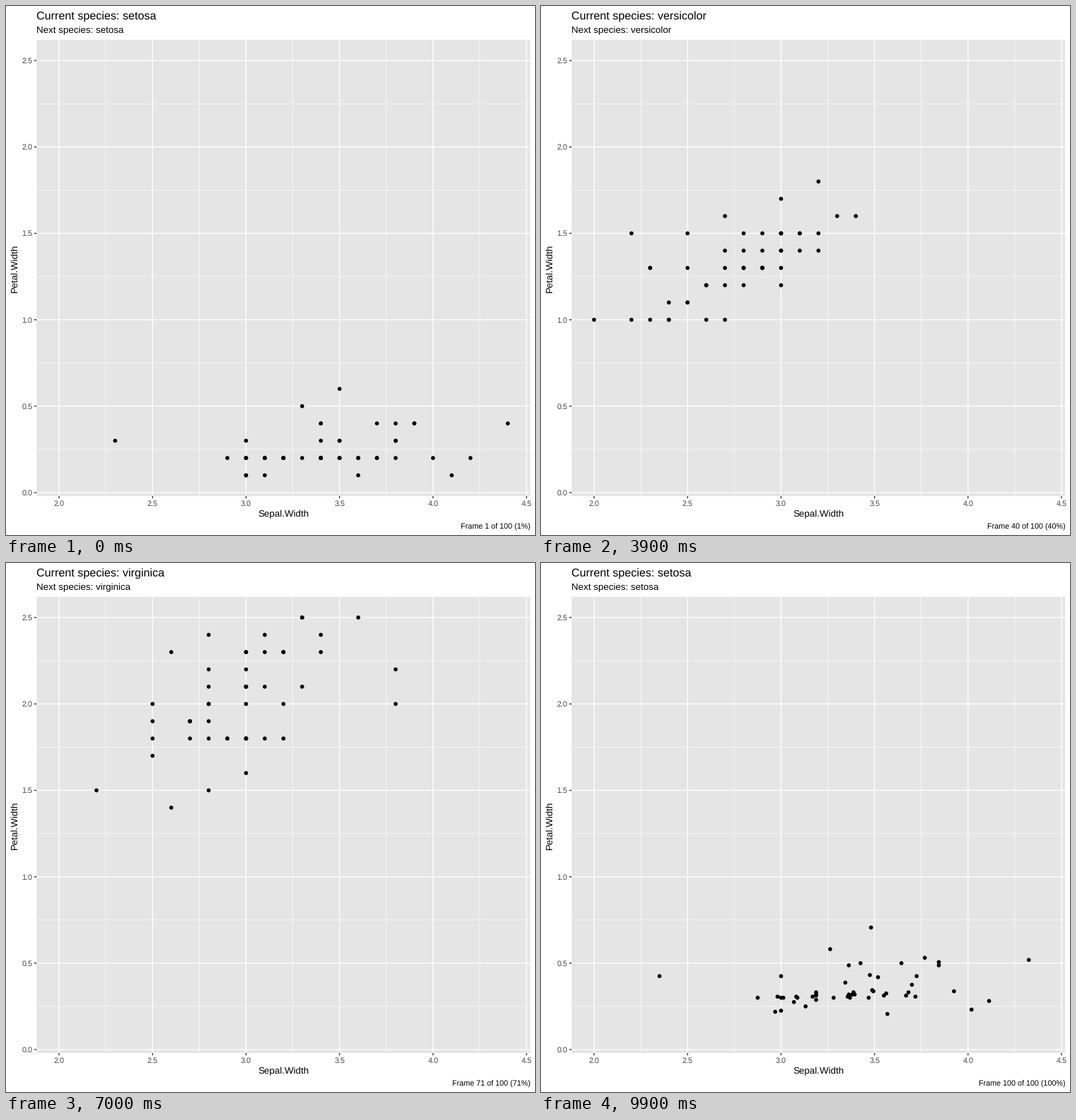
These frames come from a looping animation (748 px wide and 748 px high, 10 s). A matplotlib script:

```python
import numpy as np
import matplotlib.pyplot as plt
from matplotlib.animation import FuncAnimation

SIZE, DPI, FRAMES = 748, 100, 100
PT = 72 / DPI          # points per pixel
UNIT = 1.22            # pixels per theme point

plt.rcParams.update({
    "font.family": "Liberation Sans",
    "text.hinting": "none",
    "path.snap": False,
})

# Flower widths in tenths, one entry per plant
setosa = (
    [35, 30, 32, 31, 36, 39, 34, 34, 29, 31, 37, 34, 30, 30, 40, 44, 39,
     35, 38, 38, 34, 37, 36, 33, 34, 30, 34, 35, 34, 32, 31, 34, 41, 42,
     31, 32, 35, 36, 30, 34, 35, 23, 32, 35, 38, 30, 38, 32, 37, 33],
    [2, 2, 2, 2, 2, 4, 3, 2, 2, 1, 2, 2, 1, 1, 2, 4, 4,
     3, 3, 3, 2, 4, 2, 5, 2, 2, 4, 2, 2, 2, 2, 4, 1, 2,
     2, 2, 2, 1, 2, 2, 3, 3, 2, 6, 4, 3, 2, 2, 2, 2],
)
versicolor = (
    [32, 32, 31, 23, 28, 28, 33, 24, 29, 27, 20, 30, 22, 29, 29, 31, 30,
     27, 22, 25, 32, 28, 25, 28, 29, 30, 28, 30, 29, 26, 24, 24, 27, 27,
     30, 34, 31, 23, 30, 25, 26, 30, 26, 23, 27, 30, 29, 29, 25, 28],
    [14, 15, 15, 13, 15, 13, 16, 10, 13, 14, 10, 15, 10, 14, 13, 14, 15,
     10, 15, 11, 18, 13, 15, 12, 13, 14, 14, 17, 15, 10, 11, 10, 12, 16,
     15, 16, 15, 13, 13, 13, 12, 14, 12, 10, 13, 12, 13, 13, 11, 13],
)
virginica = (
    [33, 27, 30, 29, 30, 30, 25, 29, 25, 36, 32, 27, 30, 25, 28, 32, 30,
     38, 26, 22, 32, 28, 28, 27, 33, 32, 28, 30, 28, 30, 28, 38, 28, 28,
     26, 30, 34, 31, 30, 31, 31, 31, 27, 32, 33, 30, 25, 30, 34, 30],
    [25, 19, 21, 18, 22, 21, 17, 18, 18, 25, 20, 19, 21, 20, 24, 23, 18,
     22, 23, 15, 23, 20, 20, 18, 21, 18, 18, 18, 21, 16, 19, 20, 22, 15,
     14, 23, 24, 18, 18, 21, 24, 23, 19, 23, 25, 23, 19, 20, 23, 18],
)
NAMES = ["setosa", "versicolor", "virginica"]
STATES = [np.array(s).T / 10 for s in (setosa, versicolor, virginica)]
MOVES = [(16, 33), (50, 67), (84, 100)]   # start and end of each transition

# Panel edges in pixels
LEFT, RIGHT, TOP, BOTTOM = 43.3, 741.3, 47.8, 692.9

fig = plt.figure(figsize=(SIZE / DPI, SIZE / DPI), dpi=DPI, facecolor="white")
ax = fig.add_axes([LEFT / SIZE, 1 - BOTTOM / SIZE,
                   (RIGHT - LEFT) / SIZE, (BOTTOM - TOP) / SIZE])
ax.set(xlim=(1.88, 4.52), ylim=(-0.02, 2.62), facecolor="#E5E5E5",
       xticks=[], yticks=[])
ax.spines[:].set_visible(False)


def label(x, y, text, size, color="black", **kw):
    """Text with its baseline at pixel (x, y)."""
    kw.setdefault("va", "baseline")
    return fig.text(x / SIZE, 1 - y / SIZE, text, color=color,
                    fontsize=size * UNIT * PT, **kw)


def tick(xs, ys):
    fig.add_artist(plt.Line2D(np.array(xs) / SIZE, 1 - np.array(ys) / SIZE,
                              color="#2B2B2B", lw=1.3 * PT,
                              solid_capstyle="butt"))


def grid(xs, ys, width, z):
    style = dict(color="white", lw=width * PT, zorder=z)
    for x in xs:
        ax.axvline(x, **style)
    for y in ys:
        ax.axhline(y, **style)


x_major, y_major = np.arange(2, 4.6, 0.5), np.arange(0, 2.6, 0.5)
grid(x_major[:-1] + 0.25, y_major[:-1] + 0.25, 0.65, 1)
grid(x_major, y_major, 1.3, 2)

TICK = 2.75 * UNIT
for v in x_major:
    px = LEFT + (v - 1.88) / 2.64 * (RIGHT - LEFT)
    tick([px, px], [BOTTOM, BOTTOM + TICK])
    label(px, 706.7, f"{v:.1f}", 8.8, "#444444", ha="center")
for v in y_major:
    py = BOTTOM - (v + 0.02) / 2.64 * (BOTTOM - TOP)
    tick([LEFT - TICK, LEFT], [py, py])
    label(37.3, py + 3.8, f"{v:.1f}", 8.8, "#444444", ha="right")

label((LEFT + RIGHT) / 2, 722, "Sepal.Width", 11, ha="center")
label(16.4, (TOP + BOTTOM) / 2, "Petal.Width", 11, rotation=90,
      ha="right", va="center").set(ha="center", va="center", x=12.2 / SIZE)
title = label(LEFT, 18.5, "", 13.2)
subtitle = label(LEFT, 38.5, "", 11)
caption = label(RIGHT, 739.3, "", 8.8, ha="right")

dots = ax.scatter(*STATES[0].T, s=np.full(50, (5.7 * PT) ** 2),
                  c="black", linewidths=0, zorder=3)


def pose(i):
    """Point positions plus closest and next state at step i."""
    state = 0
    for k, (start, end) in enumerate(MOVES):
        nxt = (k + 1) % 3
        if start < i < end:
            t = (i - start) / (end - start)
            points = STATES[k] + t * (STATES[nxt] - STATES[k])
            return points, nxt if t > 0.5 else k, nxt
        if i >= end:
            state = nxt
    return STATES[state], state, state


def update(i):
    points, closest, nxt = pose(i)
    dots.set_offsets(points)
    title.set_text(f"Current species: {NAMES[closest]}")
    subtitle.set_text(f"Next species: {NAMES[nxt]}")
    caption.set_text(f"Frame {i + 1} of {FRAMES} ({i + 1}%)")
    return dots, title, subtitle, caption


anim = FuncAnimation(fig, update, frames=FRAMES, interval=100,
                     init_func=lambda: update(0), repeat=True, repeat_delay=0)
plt.show()
```
